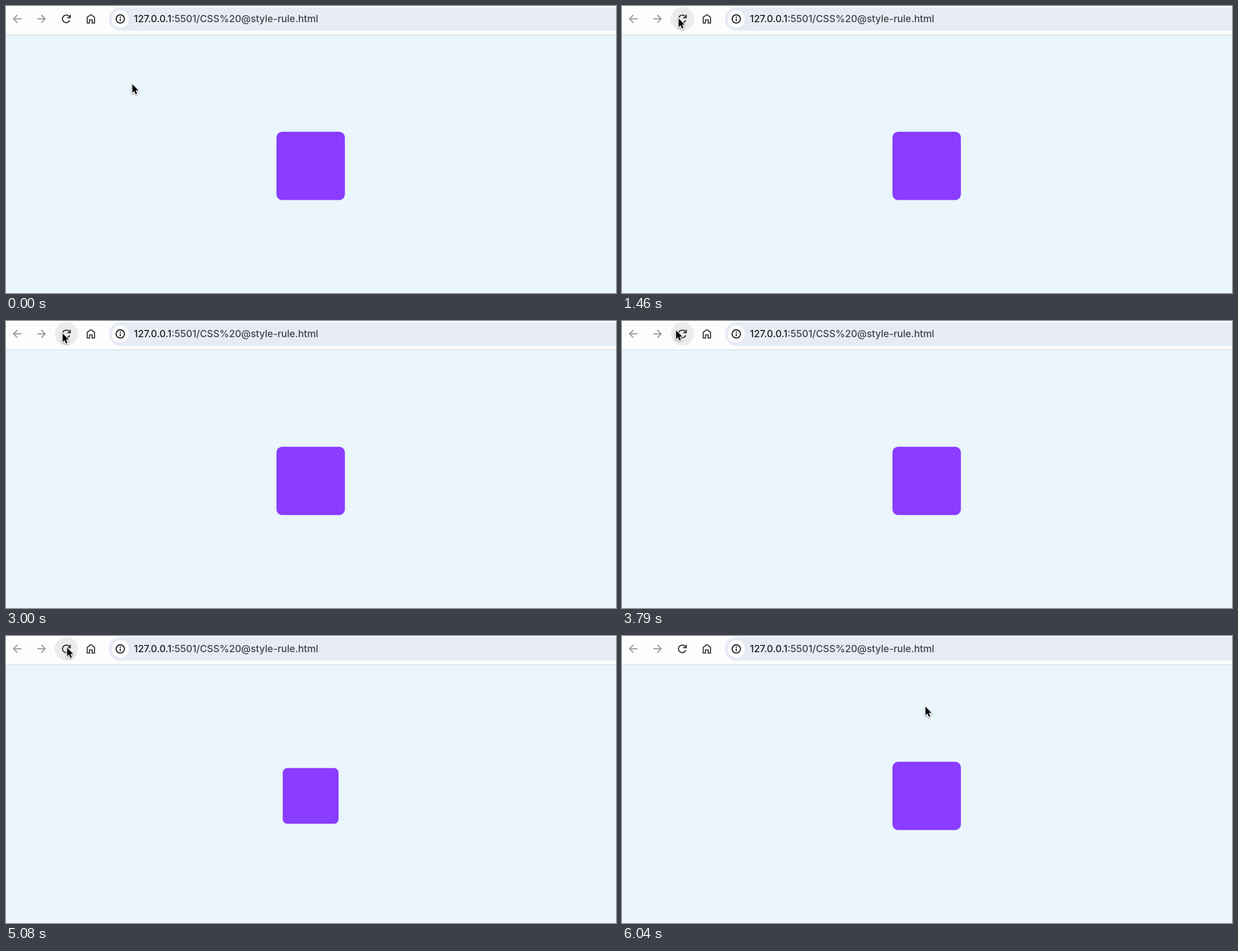
Animation, 1090 px wide and 514 px high, one loop 6.12 s. Source, as an HTML page with a canvas:

```html
<!DOCTYPE html>
<html lang="en">
<head>
<meta charset="utf-8">
<title>Starting style</title>
<style>
  html, body { margin: 0; width: 100%; height: 100%; overflow: hidden; background: #eaf5fc; }
  canvas { display: block; }
</style>
</head>
<body>
<canvas id="stage" width="1090" height="514"></canvas>
<script>
const ctx = document.getElementById('stage').getContext('2d');
const LOOP = 6120;
const GROW = 1000;
const RELOADS = [1958, 4567];
const BOX = { x: 544.4, y: 286.4, size: 122.3, radius: 10 };
const BUTTON = { x: 108, y: 23, r: 21 };
const INK = '#3c3d40', DARK = '#1f1f1f', FADED = '#9b9c9e';

// Each trip of the pointer follows one cubic curve.
const home = { x: 225.7, y: 140 };
const onButton = { x: 101.2, y: 22.3 };
const onButtonAgain = { x: 109.2, y: 21 };
const trips = [
  { from: 210, to: 1440, path: [home, { x: 130, y: 110 }, { x: 30, y: -50 }, onButton] },
  { from: 3180, to: 4170, path: [onButton, { x: 318, y: 281 }, { x: -20, y: -115 }, onButtonAgain] },
  { from: 5740, to: 6040, path: [onButtonAgain, { x: 180, y: 190 }, { x: 455, y: 140 }, { x: 542.2, y: 126.5 }] }
];

const clamp = p => Math.min(1, Math.max(0, p));
const smooth = p => p * p * (3 - 2 * p);

function cubic(u, a, b, c, d) {
  const v = 1 - u;
  return a * v ** 3 + 3 * b * v * v * u + 3 * c * v * u * u + d * u ** 3;
}

// The CSS "ease" timing function
function ease(p) {
  let lo = 0, hi = 1;
  for (let i = 0; i < 24; i++) {
    const mid = (lo + hi) / 2;
    if (cubic(mid, 0, 0.25, 0.25, 1) < p) lo = mid; else hi = mid;
  }
  return cubic(lo, 0, 0.1, 1, 1);
}

function pointerAt(t) {
  const trip = trips.filter(m => t >= m.from).pop() || trips[0];
  const u = smooth(clamp((t - trip.from) / (trip.to - trip.from)));
  const along = axis => cubic(u, ...trip.path.map(p => p[axis]));
  return { x: along('x'), y: along('y') };
}

// The page stays up briefly after a reload starts, then the box grows anew.
function scaleAt(t) {
  const start = RELOADS.filter(r => t >= r + 12).pop();
  return start ? ease(clamp((t - start) / GROW)) : 1;
}

function disc(x, y, r, fill) {
  ctx.fillStyle = fill;
  ctx.beginPath();
  ctx.arc(x, y, r, 0, Math.PI * 2);
  ctx.fill();
}

function arc(x, y, r, color, width, from = 0, to = Math.PI * 2) {
  ctx.strokeStyle = color;
  ctx.lineWidth = width;
  ctx.beginPath();
  ctx.arc(x, y, r, from, to);
  ctx.stroke();
}

function line(color, width, ...points) {
  ctx.strokeStyle = color;
  ctx.lineWidth = width;
  ctx.beginPath();
  points.forEach(p => ctx.lineTo(...p));
  ctx.stroke();
}

function roundRect(x, y, w, h, r, fill) {
  ctx.fillStyle = fill;
  ctx.beginPath();
  ctx.roundRect(x, y, w, h, r);
  ctx.fill();
}

function arrow(x, y, dir) {
  const tip = x + 6.6 * dir, back = tip - 7 * dir;
  line(FADED, 2, [x - 7.7 * dir, y], [tip, y]);
  line(FADED, 2, [back, y - 7], [tip, y], [back, y + 7]);
}

function reloadIcon({ x, y }) {
  arc(x - 0.3, y, 6.8, INK, 2.1, 0.42, -0.5);
  line(INK, 2.1, [x + 6.8, y - 7.5], [x + 6.8, y - 2], [x + 1.3, y - 2]);
}

function homeIcon(x, y) {
  const half = side => line(INK, 2, [x, y - 7.7], [x + 6.5 * side, y - 2.8],
    [x + 6.5 * side, y + 7.6], [x + 2.3 * side, y + 7.6],
    [x + 2.3 * side, y + 1.8], [x, y + 1.8]);
  half(-1);
  half(1);
}

function addressBar() {
  const x = 204.2, y = 23.2;
  roundRect(183.5, 2, 960, 42.3, 21.1, '#e7ebf4');
  disc(x, y, 15.2, '#fff');
  arc(x, y, 7.4, DARK, 2);
  line(DARK, 2, [x, y - 0.9], [x, y + 4]);
  disc(x, y - 3.5, 1.2, DARK);

  const host = '127.0.0.1', left = 228.5, base = 29.3;
  ctx.font = '500 17.25px Inter, Roboto, sans-serif';
  ctx.fillStyle = DARK;
  ctx.fillText(host, left, base);
  ctx.fillStyle = '#404246';
  ctx.fillText(':5501/CSS%20@style-rule.html', left + ctx.measureText(host).width, base);
}

function pointer({ x, y }) {
  ctx.save();
  ctx.translate(x, y);
  ctx.beginPath();
  [[0, 0], [0, 15.3], [3.5, 12.2], [5.9, 18], [8.5, 16.9], [6.1, 11.2], [10.8, 11]]
    .forEach(p => ctx.lineTo(...p));
  ctx.closePath();
  ctx.lineWidth = 2.4;
  ctx.strokeStyle = '#fff';
  ctx.shadowColor = 'rgba(0, 0, 0, 0.4)';
  ctx.shadowBlur = 3;
  ctx.shadowOffsetY = 1.2;
  ctx.stroke();
  ctx.shadowColor = 'transparent';
  ctx.fillStyle = '#000';
  ctx.fill();
  ctx.restore();
}

function toolbar(mouse) {
  ctx.fillStyle = '#fdfdfe';
  ctx.fillRect(0, 0, 1090, 51);
  ctx.fillStyle = '#d3dade';
  ctx.fillRect(0, 51, 1090, 1);
  if (Math.hypot(mouse.x - BUTTON.x, mouse.y - BUTTON.y) < BUTTON.r + 4) {
    disc(BUTTON.x, BUTTON.y, BUTTON.r, '#ececec');
  }
  arrow(20, 23, -1);
  arrow(63.5, 23, 1);
  reloadIcon(BUTTON);
  homeIcon(151.7, 23);
  addressBar();
}

function box(scale) {
  const size = BOX.size * scale;
  if (size < 1) return;
  roundRect(BOX.x - size / 2, BOX.y - size / 2, size, size, BOX.radius * scale, '#8a3cff');
}

function draw(t) {
  const mouse = pointerAt(t);
  ctx.fillStyle = '#eaf5fc';
  ctx.fillRect(0, 0, 1090, 514);
  toolbar(mouse);
  box(scaleAt(t));
  pointer(mouse);
}

const begin = performance.now();
function tick() {
  draw((performance.now() - begin) % LOOP);
  requestAnimationFrame(tick);
}
tick();
</script>
</body>
</html>
```
